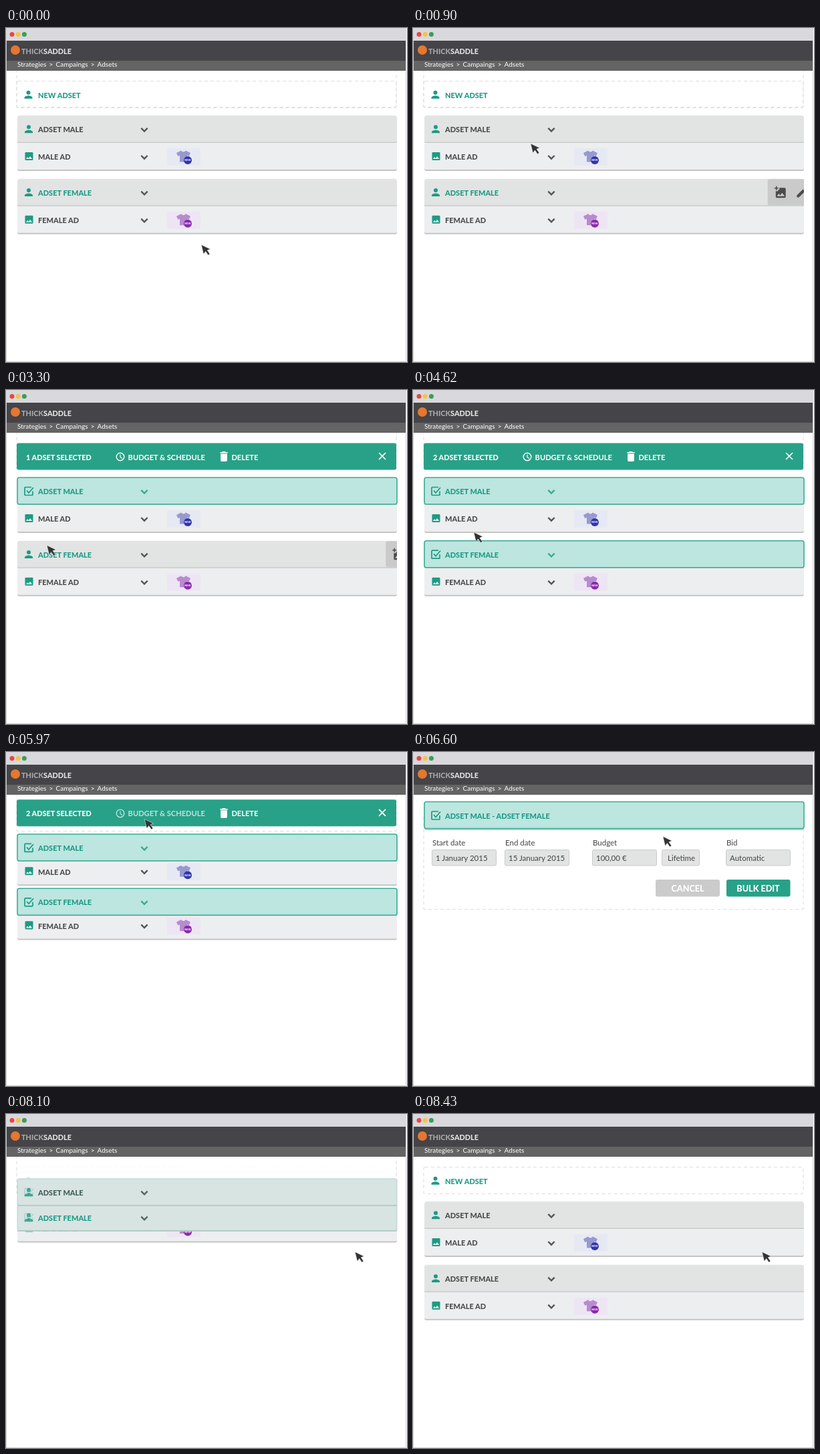
Write an HTML page that moves like this. It is 600 px wide and 500 px high and loops after 8970 ms.

```html
<!DOCTYPE html>
<html lang="en">
<head>
<meta charset="utf-8">
<title>Bulk edit adsets</title>
<style>
  html, body { margin: 0; width: 100%; height: 100%; overflow: hidden; background: #fff; }
  svg { display: block; width: 600px; height: 500px; font-family: Lato, sans-serif; }
  .title { font-size: 11px; font-weight: 800; }
  .tool { font-size: 11.1px; font-weight: 700; fill: #fff; }
  .count { font-size: 10.9px; font-weight: 800; fill: #fff; }
  .label { font-size: 11.5px; fill: #444; }
  .button { font-size: 12.6px; font-weight: 800; fill: #fff; text-anchor: middle; }
  .brand { font-size: 10.9px; font-weight: 800; }
  .crumbs { font-size: 10px; fill: #fff; word-spacing: 1.7px; }
  .badge { font-size: 3.9px; font-weight: 800; fill: #fff; text-anchor: middle; }
</style>
</head>
<body>
<svg id="stage" viewBox="0 0 600 500"></svg>
<script>
const LOOP = 8970, STEP = 30;
const TEAL = '#1d9a84', DARK = '#4b4b4b';

// Icons
const PERSON = 'M12 12a4 4 0 1 0 0-8 4 4 0 0 0 0 8zm0 2c-2.7 0-8 1.3-8 4v2h16v-2c0-2.7-5.3-4-8-4z';
const IMAGE = 'M21 19V5a2 2 0 0 0-2-2H5a2 2 0 0 0-2 2v14a2 2 0 0 0 2 2h14a2 2 0 0 0 2-2zM8.5 13.5l2.5 3 3.5-4.5 4.5 6H5z';
const PENCIL = 'M3 17.2V21h3.8L17.8 9.9 14.1 6.2zM20.7 7a1 1 0 0 0 0-1.4l-2.3-2.3a1 1 0 0 0-1.4 0l-1.8 1.8 3.7 3.7z';
const TRASH = 'M6 19a2 2 0 0 0 2 2h8a2 2 0 0 0 2-2V7H6zM19 4h-3.5l-1-1h-5l-1 1H5v2h14z';
const SHIRT = 'M7 0L0 3.5 2.2 8.5 5 7.5V17H16V7.5L18.8 8.5 21 3.5 14 0Q10.5 4 7 0Z';

const icon = (path, cx, cy, scale, fill) =>
  `<path d="${path}" fill="${fill}" transform="translate(${cx} ${cy}) scale(${scale}) translate(-12 -12)"/>`;
const line = (d, color, width, attrs = '') =>
  `<path d="${d}" fill="none" stroke="${color}" stroke-width="${width}" ${attrs}/>`;
const text = (x, y, cls, str, attrs = '') => `<text x="${x}" y="${y}" class="${cls}" ${attrs}>${str}</text>`;
const rect = (x, y, w, h, fill, r = 0, attrs = '') =>
  `<rect x="${x}" y="${y}" width="${w}" height="${h}" rx="${r}" fill="${fill}" ${attrs}/>`;
const group = (id, body) => `<g id="${id}">${body}</g>`;
const chevron = (y, color, attrs) => line(`M202.3 ${y - 2.3}l4.7 4.7 4.7-4.7`, color, 2.4, attrs);
const dashed = (y, h) => rect(16, y, 568, h, 'none', 2, 'stroke="#dedede" stroke-width="1.1" stroke-dasharray="5 4"');

const actions = id => group(id,
  rect(451, 0.5, 140, 39, '#cacaca', 3) +
  icon(IMAGE, 470.5, 21, .83, DARK) +
  line('M464.5 10.500v8M460.5 14.500h8', '#cacaca', 4) + line('M464 11v6M461 14h6', DARK, 1.5) +
  icon(PENCIL, 502, 20.5, .82, DARK) +
  icon(TRASH, 533.5, 20.5, .84, DARK) +
  line('M563.5 14l7 6.5-7 6.5', DARK, 2.8));

function adsetRow(id, top, title, color) {
  const mid = top + 20.5;
  const box = rect(28, mid - 6, 12, 12, 'none', 1, `stroke="${TEAL}" stroke-width="1.8"`);
  const checked = line(`M38 ${mid - 6}H29q-1 0-1 1v10q0 1 1 1h10q1 0 1-1v-5M31 ${mid - 1}l3 3.5 7-8`, TEAL, 1.7);
  return group(id,
    `<path d="M17 ${top + 41}v-37q0-4 4-4h560q4 0 4 4v37z" fill="#e1e4e3"/>` +
    rect(17, top + 39.6, 568, 1.4, '#c9cbca') +
    group(id + 'Person', icon(PERSON, 34, mid - .3, .75, TEAL)) +
    group(id + 'Box', box) +
    text(48, mid + 4.7, 'title', title, `id="${id}Title" fill="${color}"`) +
    chevron(mid + .7, '#555') +
    `<g clip-path="url(#rowClip)"><g transform="translate(0 ${top})">${actions(id + 'Actions')}</g></g>` +
    group(id + 'Sel',
      rect(17, top, 568, 40, '#bce6df', 3, 'stroke="#3aab95" stroke-width="1.6"') + checked +
      text(48, mid + 4.7, 'title', title + (id === 'male' ? '<tspan id="merged"> - ADSET FEMALE</tspan>' : ''), `fill="${TEAL}"`) +
      chevron(mid + .7, '#3aab95', `id="${id}Chevron"`)));
}

function adRow(id, top, title, thumb, shirt, badge) {
  const mid = top + 21;
  return group(id,
    rect(17, top + 1, 568, 41, '#c3c5c4', 3) + rect(17, top, 568, 40, '#edeef0', 2) +
    icon(IMAGE, 34.5, mid - 1, .67, TEAL) +
    text(48, mid + 4.3, 'title', title, `fill="${DARK}"`) + chevron(mid + .3, '#555') +
    rect(241, mid - 13, 50, 26, thumb) +
    `<path d="${SHIRT}" fill="${shirt}" transform="translate(255 ${mid - 9.5})"/>` +
    `<circle cx="272" cy="${mid + 5}" r="6" fill="${badge}"/>` + text(272, mid + 6.4, 'badge', 'NEW'));
}

const field = (x, w, str, label = '', tx = x + 6) =>
  text(x + 1, 140, 'label', label) +
  rect(x + .5, 146.5, w - 1, 23.5, '#e1e4e3', 2, 'stroke="#c9cbca"') + text(tx, 162.5, 'label', str);

const form =
  field(28, 97, '1 January 2015', 'Start date') +
  field(137, 97, '15 January 2015', 'End date') +
  field(268, 97, '100,00 €', 'Budget') +
  field(372, 57, 'Lifetime', '', 381) +
  field(468, 97, 'Automatic', 'Bid') +
  rect(363, 191, 96, 25.5, '#cbcbcb', 3) + text(411, 208.5, 'button', 'CANCEL') +
  rect(469, 191, 95.5, 25.5, '#28a188', 3) + text(516.5, 208.5, 'button', 'BULK EDIT');

const toolbar =
  rect(16, 79.4, 568, 40, '#28a188', 3) +
  text(30, 104.5, 'count', '<tspan id="count">1</tspan> ADSET SELECTED') +
  group('budget',
    '<circle cx="171" cy="100" r="5.8" fill="none" stroke="#fff" stroke-width="1.4"/>' +
    line('M171 96.5v4l3 2', '#fff', 1.2) + text(182.6, 104.5, 'tool', 'BUDGET &amp; SCHEDULE')) +
  icon(TRASH, 326, 99.5, .82, '#fff') + text(337.4, 104.5, 'tool', 'DELETE') +
  line('M558 94l10 10M568 94l-10 10', '#fff', 1.7);

const chrome =
  rect(0, 0, 600, 19, '#d8d8dd') +
  ['#e8473f', '#f5c443', '#3b9d58'].map((c, i) => `<circle cx="${9 + i * 9.2}" cy="9.5" r="3.5" fill="${c}"/>`).join('') +
  rect(0, 19, 600, 30, '#454448') + rect(0, 49, 600, 15, '#646464') +
  '<circle cx="14" cy="33" r="7" fill="#e5772e"/>' +
  text(23, 38.5, 'brand', '<tspan fill="#a9a9ab">THICK</tspan><tspan fill="#e4e4e4">SADDLE</tspan>') +
  text(17, 58, 'crumbs', 'Strategies &gt; Campaings &gt; Adsets') +
  line('M.5 19V499.5H598.5V19', '#d3d3d6', 1) + rect(599, 0, 1, 500, '#fff');

document.getElementById('stage').innerHTML =
  `<defs><clipPath id="rowClip"><rect x="17" y="0" width="568" height="500"/></clipPath>
   <clipPath id="formClip"><rect x="0" y="115" width="600" height="385"/></clipPath></defs>` +
  group('newAdset', dashed(79.5, 40) + icon(PERSON, 33.5, 99.7, .75, TEAL) +
    text(48, 104.7, 'title', 'NEW ADSET', `fill="${TEAL}"`)) +
  group('formBox', dashed(95, 140.5)) +
  `<g clip-path="url(#formClip)">${group('form', form)}</g>` +
  group('toolbar', toolbar) +
  adRow('femaleAd', 266.7, 'FEMALE AD', '#eee5f4', '#b78ccf', '#8a2aae') +
  adRow('maleAd', 172, 'MALE AD', '#e6e9f4', '#9799cf', '#2f35ac') +
  adsetRow('female', 225.7, 'ADSET FEMALE', TEAL) +
  rect(17, 100, 568, 17, '#b5c9c5', 3, 'id="mergedShadow"') +
  adsetRow('male', 131, 'ADSET MALE', DARK) +
  chrome +
  '<path id="cursor" fill="#333" stroke="#fff" stroke-width=".5" d="M-.8-.5l13.5 6.5-4.5 1.800 3.800 5.500-2.500 1.800-3.800-5.600-3.100 4z"/>';

const el = Object.fromEntries([...document.querySelectorAll('[id]')].map(n => [n.id, n]));
const ramp = (t, start, dur) => Math.min(1, Math.max(0, (t - start) / dur));
const ease = (t, start, dur) => {
  const p = ramp(t, start, dur);
  return p < .5 ? 2 * p * p : 1 - 2 * (1 - p) ** 2;
};
const pulse = (t, on, off, dur) => ease(t, on, dur) - ease(t, off, dur);
const move = (id, x, y) => el[id].setAttribute('transform', `translate(${x} ${y})`);
const fade = (id, opacity) => el[id].setAttribute('opacity', opacity);

// Cursor path: start, end, then from / bend / to points
const MOVES = [
  [0, 1770, [293, 325], [195, 112], [33, 151]],
  [2790, 3600, [33, 151], [95, 247], [33, 245]],
  [4300, 5550, [33, 245], [157, 187], [208, 101]],
  [5970, 7230, [208, 101], [384, 100], [523, 207]],
];
function cursorAt(t) {
  const [start, end, a, b, c] = MOVES.filter(m => t >= m[0]).pop();
  const u = ramp(t, start, end - start);
  return [0, 1].map(i => a[i] * (1 - u) ** 2 + 2 * b[i] * u * (1 - u) + c[i] * u * u);
}

function draw(t) {
  const collapse = pulse(t, 5850, 7900, 450);
  const open = pulse(t, 6200, 7500, 400);
  const bar = ease(t, 2100, 400);
  const deselect = ease(t, 7900, 300);
  const merged = collapse > .92;

  move('cursor', ...cursorAt(t));
  move('maleActions', 134 * (1 - pulse(t, 930, 2040, 400)), 0);
  move('femaleActions', 134 * (1 - pulse(t, 280, 680, 400) - pulse(t, 3200, 4080, 400)), 0);

  for (const [id, on, click] of [['male', 1480, 2010], ['female', 3430, 4050]]) {
    const hover = ramp(t, on, 120) - ramp(t, 7600, 60);
    fade(id + 'Person', 1 - hover);
    fade(id + 'Box', hover);
    fade(id + 'Sel', ease(t, click, 300) - deselect);
  }
  el.femaleTitle.setAttribute('fill', t < 8430 ? TEAL : DARK);

  move('male', 0, -56.5 * collapse);
  move('maleAd', 0, -97 * collapse);
  move('female', 0, -150.5 * collapse);
  move('femaleAd', 0, -192 * collapse);
  for (const id of ['maleAd', 'female', 'femaleAd']) fade(id, collapse < 1 ? 1 : 0);
  fade('merged', merged ? 1 : 0);
  fade('mergedShadow', merged ? 1 : 0);
  fade('maleChevron', merged ? 0 : 1);

  move('toolbar', 0, -56.5 * collapse);
  fade('toolbar', t < 6400 ? bar : 0);
  el.count.textContent = t < 4080 ? 1 : 2;
  fade('budget', 1 - .3 * ramp(t, 5340, 150));

  fade('newAdset', t < 5000 ? 1 - bar : ease(t, 8000, 400));
  move('form', 0, -117 * (1 - open));
  move('formBox', 0, -117 * (1 - open));
  fade('formBox', t < 8430 ? 1 : 0);
}

function tick() {
  draw(Math.floor(performance.now() % LOOP / STEP) * STEP);
  requestAnimationFrame(tick);
}
tick();
</script>
</body>
</html>
```
